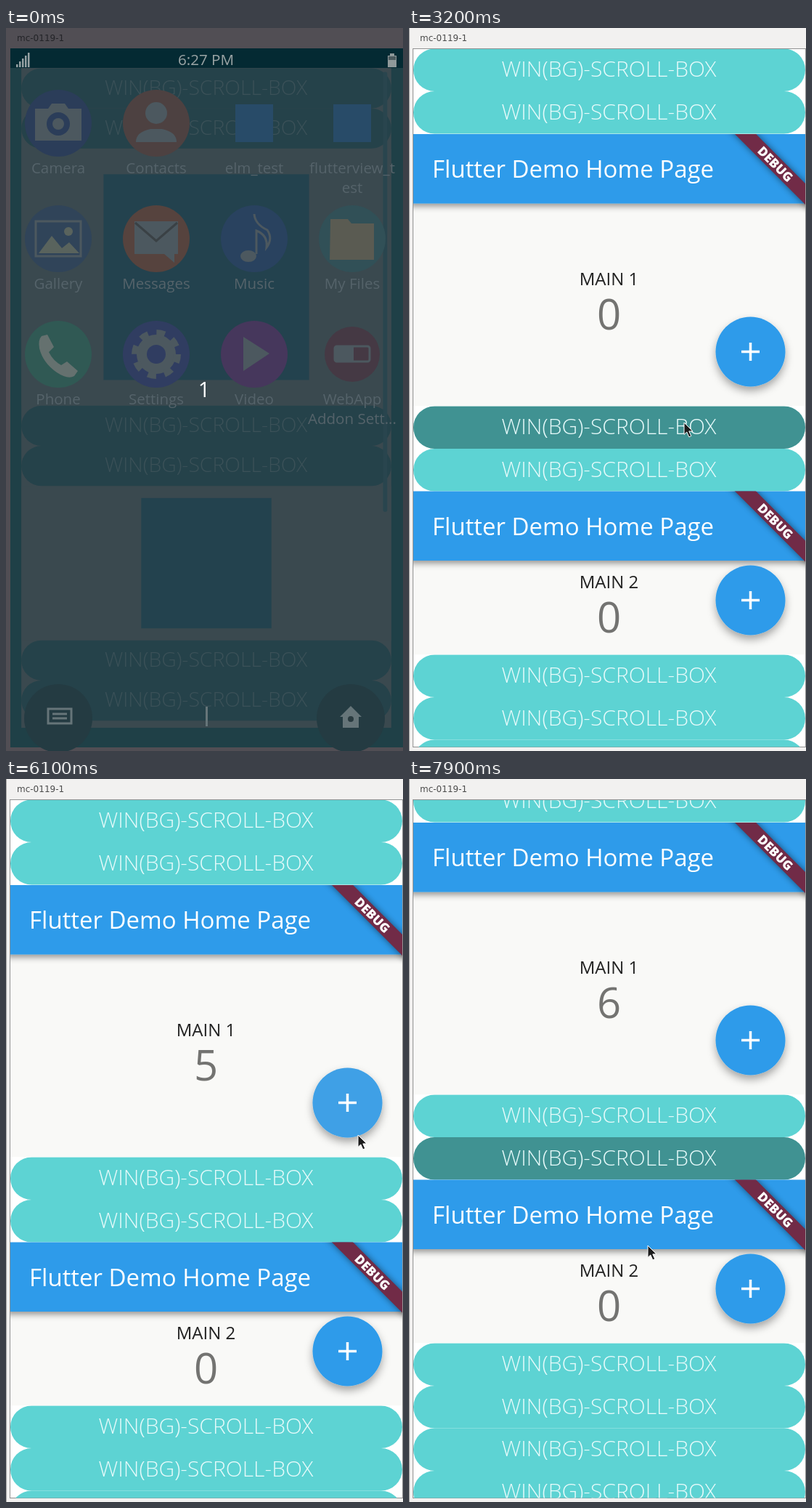
Recreate the animation shown at these times as an HTML page. Size 547 by 995 pixels, loop 8 s.

```html
<!DOCTYPE html>
<html lang="en">
<head>
<meta charset="utf-8">
<title>Scroll demo</title>
<style>
html, body { margin: 0; width: 100%; height: 100%; overflow: hidden; background: #f2f1f0; }
svg { display: block; width: 100vw; height: 100vh; font-family: "Open Sans", "Noto Sans", sans-serif; }
text { white-space: pre; }
.mid { text-anchor: middle; }
.os { font: 12px "DejaVu Sans", sans-serif; }
</style>
</head>
<body>
<svg id="stage" viewBox="0 0 547 995"></svg>
<script>
const LOOP = 8000, ROW = 58.5, TOP = 28.5, FADE = 450;
const stage = document.getElementById('stage');
const rowY = [28.5, 87, 520.5, 579];
for (let i = 0; i < 11; i++) rowY.push(862.5 + i * ROW);

const rect = (x, y, w, h, fill, more = '') =>
  `<rect x="${x}" y="${y}" width="${w}" height="${h}" fill="${fill}" ${more}/>`;
const circle = (x, y, r, fill, more = '') =>
  `<circle cx="${x}" cy="${y}" r="${r}" fill="${fill}" ${more}/>`;
const text = (x, y, size, fill, str, more = 'class="mid"') =>
  `<text x="${x}" y="${y}" font-size="${size}" fill="${fill}" ${more}>${str}</text>`;
const path = (d, fill, more = '') => `<path d="${d}" fill="${fill}" ${more}/>`;

function row(y, fill, ink, shade = '') {
  const pill = 'rx="29.25"';
  return rect(6, y, 540, ROW, fill, pill) + shade +
    text(275.5, y + 38.5, 30, ink, 'WIN(BG)-SCROLL-BOX', 'class="mid" font-weight="300"');
}

// One embedded app: y is its top, h its height, label its baseline offset
function pane(id, y, h, label, fabY, name) {
  const cx = 470.5, cy = y + fabY;
  return `<g id="${id}" clip-path="url(#${id}Clip)">
    <clipPath id="${id}Clip">${rect(6, y, 540, h, '#000')}</clipPath>
    ${rect(6, y, 540, h, '#f9f9f7')}
    ${rect(0, y - 4, 552, 99.5, '#2d9bea', 'filter="url(#barShade)"')}
    ${text(32, y + 60, 33, '#fff', 'Flutter Demo Home Page', '')}
    <g transform="translate(546 ${y}) rotate(45)">
      ${rect(-100, 48, 200, 20.6, '#000', 'opacity=".5" filter="url(#soft)"')}
      ${rect(-100, 48, 200, 20.6, '#712b47')}
      ${text(0, 64.6, 17.5, '#fff', 'DEBUG', 'class="mid" font-weight="800"')}
    </g>
    ${text(275.5, y + label, 24, '#212121', name)}
    ${text(275.5, y + label + 61, 58, '#737371', '0', `id="${id}Count" class="mid"`)}
    ${circle(cx, cy, 48, '#2d9bea', 'filter="url(#fabShade)"')}
    ${circle(cx, cy, 48, '#d0c8c0', `id="${id}Glow" opacity="0"`)}
    ${path(`M${cx - 12.5} ${cy}h25M${cx} ${cy - 12.5}v25`, 'none', 'stroke="#fff" stroke-width="3.5"')}
  </g>`;
}

const splash = (id, y, h, side, fill, back) => `<g id="${id}">${rect(6, y, 540, h, back)}
  ${rect(276 - side / 2, y + h / 2 - side / 2, side, side, fill)}</g>`;

function launcher() {
  const ink = '#55636a', glyph = '#4c585f';
  const line = `stroke="${glyph}" stroke-width="3"`;
  // name, second line, disc colour, glyph around 0,0
  const apps = [
    ['Camera', '', '#2b3d59', path('M-32 -20h18l5 -7h18l5 7h18v44h-64z', glyph) + circle(0, 1, 16, '#2b3d59') + circle(0, 1, 8, glyph)],
    ['Contacts', '', '#4d4141', circle(0, -14, 15, glyph) + path('M-28 26q0 -14 20 -18h16q20 4 20 18z', glyph)],
    ['elm_test', '', '', rect(-26, -26, 52, 52, '#284b68')],
    ['flutterview_t', 'est', '', rect(-26, -26, 52, 52, '#284b68')],
    ['Gallery', '', '#304459', rect(-31, -24, 62, 48, 'none', line) + path('M-27 20l18 -24 14 17 10 -8 14 15z', '#59635d') + circle(14, -10, 6, '#59635d')],
    ['Messages', '', '#56433e', path('M-30 -24h60v45h-5v12l-14 -12h-41z', glyph) + path('M-29 -22l29 25 29 -25', 'none', 'stroke="#3a4145" stroke-width="3"')],
    ['Music', '', '#29425f', path('M0 -34q1 14 18 22q8 12 -1 24q2 -17 -14 -23v32', 'none', line) + `<ellipse cx="-8" cy="24" rx="11" ry="8" fill="${glyph}"/>`],
    ['My Files', '', '#315057', path('M-30 -27h24l5 6h31v50h-61z', '#5a5b52')],
    ['Phone', '', '#305954', path('M-23 -25l8 -2 9 17 -7 7q6 12 17 18l8 -5 15 13 -5 7q-9 5 -24 -5q-19 -13 -24 -33q-2 -12 3 -17z', '#65716f')],
    ['Settings', '', '#303d61', circle(0, 0, 20, 'none', `stroke="${glyph}" stroke-width="14"`) + circle(0, 0, 29, 'none', `stroke="${glyph}" stroke-width="10" stroke-dasharray="11.4 11.4"`)],
    ['Video', '', '#46375c', path('M-15 -24l36 23 -36 24z', glyph)],
    ['WebApp', 'Addon Sett...', '#453944', rect(-24, -11, 48, 21, 'none', `rx="3" ${line}`) + rect(-23, -10, 25, 19, glyph)]
  ];
  return apps.map(([name, more, disc, art], i) => {
    const x = 72 + i % 4 * 135, y = 131 + Math.floor(i / 4) * 159;
    return `<g transform="translate(${x} ${y})">${disc ? circle(0, 0, i === 11 ? 38 : 46, disc) : ''}
      ${art}${text(0, 69, 20.5, ink, name)}${text(0, 96, 20.5, ink, more)}</g>`;
  }).join('');
}

function intro() {
  const nav = '#667579';
  return `<g id="intro">
    ${rect(0, 0, 547, 995, '#514e54')}${text(15, 18, 12, '#232428', 'mc-0119-1', 'class="os"')}
    ${rect(6, 28, 541, 962, '#1f4047')}${rect(6, 28, 541, 27, '#042a33')}
    <g transform="translate(276 509) scale(.944) translate(-276 -509)">
      ${rect(6, 28, 540, 962, '#3a494f')}
      ${splash('introOne', 146, 374, 300, '#23424e', '#3a494f')}
      ${splash('introTwo', 637.5, 225, 190, '#23424e', '#3a494f')}
      ${rowY.slice(0, 6).map(y => row(y, '#25424a', '#3b5158')).join('')}
      ${rect(534, 34, 6, 641, '#29454e', 'rx="2"')}
    </g>
    ${circle(72, 950, 47, '#243b42')}${circle(475, 950, 47, '#243b42')}
    ${launcher()}
    ${[0, 1, 2, 3, 4].map(i => rect(14 + i * 4, 50 - i * 4, 2.5, 4 + i * 4, '#96a1a3')).join('')}
    ${text(275.5, 51, 20.6, '#9ba4a5', '6:27 PM')}
    ${rect(526, 38, 12, 16, '#8f999a')}${rect(529, 35, 6, 3, '#8f999a')}${rect(527, 39, 10, 5, '#4b5a5e')}
    ${path('M66 957h-8v-20h32v20h-24M64 944h20M64 950h20', 'none', `stroke="${nav}" stroke-width="3"`)}
    ${rect(275, 934, 3, 27, nav)}
    ${path('M475 933l15 15h-4v15h-22v-15h-4z', nav)}${circle(475, 951, 4, '#2a3b40')}
    ${text(273, 508, 29, '#fff', '1')}
  </g>`;
}

stage.innerHTML = `
  <defs>
    <clipPath id="screen">${rect(6, 29, 540, 960.5, '#000')}</clipPath>
    <filter id="barShade" x="-5%" y="-20%" width="110%" height="150%"><feDropShadow dx="0" dy="4" stdDeviation="4" flood-opacity=".4"/></filter>
    <filter id="fabShade" x="-30%" y="-30%" width="160%" height="170%"><feDropShadow dx="0" dy="6" stdDeviation="6" flood-opacity=".34"/></filter>
    <filter id="soft" x="-10%" y="-100%" width="120%" height="300%"><feGaussianBlur stdDeviation="5"/></filter>
  </defs>
  ${rect(0, 0, 547, 995, '#f2f1f0')}
  ${rect(0, 0, 1, 995, '#a9a9a8')}
  ${text(15, 18, 12, '#4c4c4c', 'mc-0119-1', 'class="os"')}
  ${rect(5.5, 28.5, 541, 961, '#fff', 'stroke="#929292"')}
  <g clip-path="url(#screen)">
    <g id="page">
      ${rowY.map((y, i) => row(y, '#5dd3d3', '#e6fafa',
        rect(6, y, 540, ROW, '#000', `id="shade${i}" rx="29.25" opacity="0"`))).join('')}
      ${pane('one', 146, 374.5, 208, 299.5, 'MAIN 1')}
      ${pane('two', 637.5, 225, 133.5, 150, 'MAIN 2')}
      ${splash('splashOne', 146, 374.5, 300, '#54c5f8', '#fff')}
      ${splash('splashTwo', 637.5, 225, 190, '#54c5f8', '#fff')}
    </g>
    ${rect(534, 34, 6, 641, '#3ebcbf', 'id="bar" rx="2"')}
  </g>
  <g id="cursor">${path('M0 0v16.5l3.8 -3.5 3 6.8 3 -1.3 -3 -6.6h5.2z', '#1b1b1b', 'stroke="#fff" stroke-width="1"')}</g>
  ${intro()}`;

const $ = id => document.getElementById(id);
const set = (id, name, value) => $(id).setAttribute(name, value);
const show = (id, on) => set(id, 'display', on ? 'inline' : 'none');
const clamp = v => Math.max(0, Math.min(1, v));

// Linear track through [time, ...values] points
function track(points, t) {
  const next = points.findIndex(p => p[0] > t);
  if (next === 0) return points[0].slice(1);
  if (next < 0) return points[points.length - 1].slice(1);
  const a = points[next - 1], b = points[next], k = (t - a[0]) / (b[0] - a[0]);
  return a.slice(1).map((v, i) => v + (b[i + 1] - v) * k);
}

const pointer = [
  [2400, 258, 55], [2700, 330, 320], [3000, 379, 543], [3300, 379, 543], [3700, 365, 366], [3800, 365, 366],
  [4200, 300, 58], [4400, 300, 58], [4700, 455, 392], [4800, 472, 437], [5600, 480, 470],
  [6100, 485, 490], [6400, 485, 490], [7000, 400, 450], [7100, 400, 450], [7200, 395, 440],
  [7300, 386, 345], [7400, 378, 253], [7500, 372, 250], [7700, 345, 385], [7800, 336, 520], [7900, 329, 642]
];
const scroll = [[7200, 0], [7300, 50], [7400, 167], [7500, 215], [7600, 225], [7700, 225], [7800, 180], [7900, 86]];
const barAlpha = [[800, 1], [1100, 0], [7200, 0], [7300, 1], [7500, 1], [7800, 0]];
const clicks = [5000, 5200, 5500, 5700, 6000, 6400];
// row index, press time, release time
const presses = [[2, 3200, 3250], [0, 4200, 4400], [3, 7700, LOOP]];

function draw(time) {
  const t = Math.floor(time / 100) * 100;
  const [y] = track(scroll, t), [mx, my] = track(pointer, t);
  show('intro', t < 100);
  show('splashTwo', t < 1300);
  show('splashOne', t < 1500);
  set('page', 'transform', `translate(0 ${-y})`);
  set('bar', 'y', 34 + y * .667);
  set('bar', 'opacity', track(barAlpha, t)[0] * .7);
  for (const [i, down, up] of presses) {
    set('shade' + i, 'opacity', t < down ? 0 : .31 * clamp(1 - (t - up) / FADE));
  }
  const done = clicks.filter(c => c <= t);
  $('oneCount').textContent = done.length;
  set('oneGlow', 'opacity', done.length ? .13 * clamp(1 - (t - done[done.length - 1]) / 400) : 0);
  show('cursor', t >= 2400);
  set('cursor', 'transform', `translate(${mx} ${my})`);
}

const start = performance.now();
function tick() {
  draw((performance.now() - start) % LOOP);
  requestAnimationFrame(tick);
}
draw(0);
requestAnimationFrame(tick);
</script>
</body>
</html>
```
